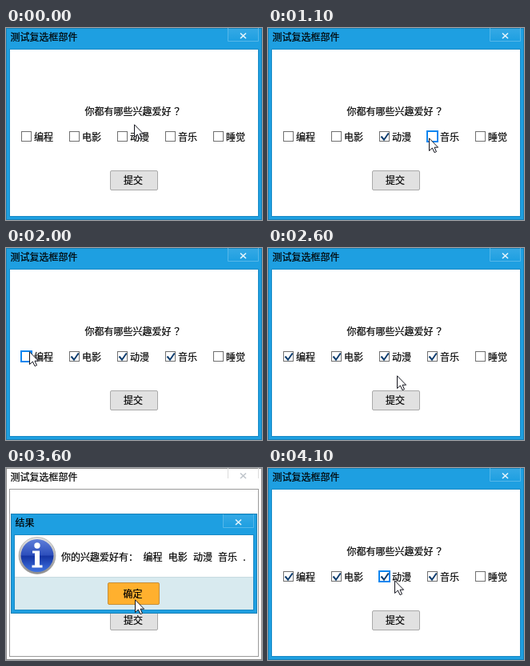
Write an HTML page that moves like this. It is 320 by 240 pixels and loops after 4.3 s.

```html
<!DOCTYPE html>
<html lang="zh-CN">
<head>
<meta charset="utf-8">
<style>
html, body { margin: 0; width: 100%; height: 100%; overflow: hidden; background: #fff; }
svg { display: block; width: 100vw; height: 100vh; }
text { font: 12px "Noto Sans CJK SC", "Noto Sans CJK", "Noto Sans", sans-serif; fill: #000; stroke: #000; stroke-width: .2; }
.centred { font-family: "Noto Sans CJK TC", "Noto Sans CJK", sans-serif; }
.sharp { shape-rendering: crispEdges; }
</style>
</head>
<body>
<svg id="stage" viewBox="0 0 320 240">
  <defs>
    <linearGradient id="ball" x1="0" y1="0" x2="0" y2="1">
      <stop offset="0" stop-color="#5f7fda"/>
      <stop offset=".48" stop-color="#2d4fbc"/>
      <stop offset=".52" stop-color="#1535a4"/>
      <stop offset="1" stop-color="#3f74e2"/>
    </linearGradient>
    <linearGradient id="rim" x1="0" y1="0" x2="0" y2="1">
      <stop offset="0" stop-color="#e4e4e4"/>
      <stop offset="1" stop-color="#8c8c8c"/>
    </linearGradient>
    <linearGradient id="gloss" x1="0" y1="0" x2="0" y2="1">
      <stop offset="0" stop-color="#35a9e5"/>
      <stop offset="1" stop-color="#1e9fe1"/>
    </linearGradient>
  </defs>
</svg>
<script>
const LOOP = 4300, STEP = 50;
const BLUE = '#1e9fe1', EDGE = '#1a80b5', INNER_EDGE = '#1a8ac5';
const stage = document.getElementById('stage');

function add(parent, tag, attrs, content) {
  const el = document.createElementNS('http://www.w3.org/2000/svg', tag);
  set(el, attrs);
  if (content) el.textContent = content;
  parent.appendChild(el);
  return el;
}
function set(el, attrs) {
  for (const name in attrs) el.setAttribute(name, attrs[name]);
}
// Outlined box whose 1px border lies inside the given bounds.
function box(parent, x, y, w, h, fill, stroke) {
  return add(parent, 'rect', { class: 'sharp', x: x + .5, y: y + .5, width: w - 1, height: h - 1, fill, stroke });
}
function label(parent, x, y, content) {
  return add(parent, 'text', { x, y }, content);
}

function closeButton(parent, x, y) {
  const g = add(parent, 'g', { transform: `translate(${x} ${y})` });
  const face = add(g, 'rect', { class: 'sharp', x: 1, y: 1, width: 37, height: 15 });
  const frame = add(g, 'path', { fill: 'none' });
  const cross = add(g, 'path', { d: 'M16 6.5l7 6.5M23 6.5l-7 6.5', 'stroke-width': 1.6 });
  return active => {
    set(face, { fill: active ? 'url(#gloss)' : '#fff' });
    set(frame, { stroke: active ? '#55b7e9' : '#dcdcdc', d: active ? 'M.5 0V16.5H38.5V0' : 'M.5 0V13M38.5 0V13' });
    set(cross, { stroke: active ? '#e6f5fc' : '#bfc5cb' });
  };
}

function button(parent, x, y, w, h, caption) {
  const face = add(parent, 'rect', { x: x + .5, y: y + .5, width: w - 1, height: h - 1, rx: 1.5 });
  label(parent, x + w / 2 - 1, y + h / 2 + 4.5, caption).setAttribute('text-anchor', 'middle');
  const looks = {
    normal: { fill: '#e1e1e1', stroke: '#a9a9a9' },
    hover: { fill: '#a9d8e6', stroke: '#8aa9b3' },
    pressed: { fill: '#ffb02e', stroke: '#c48f3c' }
  };
  return look => set(face, looks[look]);
}

function checkbox(parent, x, caption) {
  const square = add(parent, 'rect', { class: 'sharp', fill: '#fff' });
  const tick = add(parent, 'path', {
    d: `M${x + 2.5} 135.5l3.5 4.2 5.7-8.2`, fill: 'none', stroke: '#0c3c6e', 'stroke-width': 2
  });
  label(parent, x + 16, 141, caption);
  return (hover, checked) => {
    set(square, hover
      ? { x, y: 129, width: 13, height: 13, stroke: '#0d86f0', 'stroke-width': 2 }
      : { x: x + .5, y: 129.5, width: 12, height: 12, stroke: '#707070', 'stroke-width': 1 });
    set(tick, { visibility: checked ? 'visible' : 'hidden' });
  };
}

// Main window
const main = add(stage, 'g', {});
const mainFrame = box(main, 0, 0, 320, 240);
const mainBody = box(main, 4, 26, 312, 210, '#fff');
const mainClose = closeButton(main, 277, 0);
label(main, 5.5, 16, '测试复选框部件');
label(main, 98.5, 109, '你都有哪些兴趣爱好');
label(main, 207.5, 109, '？').setAttribute('class', 'centred');
const options = [['编程', 2250], ['电影', 1800], ['动漫', 850], ['音乐', 1200], ['睡觉', Infinity]]
  .map(([caption, checkedAt], i) => {
    const x = 19 + 60 * i;
    return { x, checkedAt, draw: checkbox(main, x, caption) };
  });
const submit = button(main, 130, 178, 60, 25, '提交');

// Result dialog
const dialog = add(stage, 'g', {});
box(dialog, 6, 57, 308, 125, BLUE, EDGE);
box(dialog, 10, 83, 300, 95, '#fff', INNER_EDGE);
add(dialog, 'rect', { x: 11, y: 136, width: 298, height: 41, fill: '#d8eaef' });
add(dialog, 'rect', { x: 11, y: 136, width: 298, height: 1, fill: '#c8dbe1' });
closeButton(dialog, 271, 58)(true);
label(dialog, 11.5, 73, '结果');
add(dialog, 'circle', { cx: 39, cy: 109.5, r: 23, fill: 'url(#rim)', stroke: '#999', 'stroke-width': .6 });
add(dialog, 'circle', { cx: 39, cy: 109.5, r: 20.5, fill: 'url(#ball)' });
add(dialog, 'circle', { cx: 39, cy: 97, r: 3.7, fill: '#fff' });
add(dialog, 'path', { d: 'M33 103.5h9v18h3.5v3h-13v-3H36v-15h-3z', fill: '#fff' });
label(dialog, 69, 116, '你的兴趣爱好有：');
['编程', '电影', '动漫', '音乐', '.'].forEach((word, i) => label(dialog, 171.5 + 31.2 * i, 116, word));
const confirm = button(dialog, 127, 143, 65, 28, '确定');

const cursor = add(stage, 'path', {
  d: 'M.5 .8V16.5L4.4 13 7 18.6 9.5 17.6 7 12.2H11.6Z', fill: '#fff', stroke: '#14151e'
});

const route = [
  [0, 160, 120], [550, 160, 120], [750, 149, 137], [850, 149, 137], [1100, 201, 137],
  [1200, 201, 137], [1450, 95, 127], [1550, 95, 127], [1650, 88, 135], [1800, 88, 135],
  [2000, 29, 129], [2250, 29, 129], [2600, 161, 159], [2700, 160, 189], [3150, 160, 189],
  [3400, 161, 164], [3900, 161, 164], [4100, 158, 140], [LOOP, 158, 140]
];
function pointer(t) {
  const i = route.findIndex(key => key[0] > t);
  const [t0, x0, y0] = route[i - 1], [t1, x1, y1] = route[i];
  const k = (t - t0) / (t1 - t0);
  return [Math.round(x0 + (x1 - x0) * k), Math.round(y0 + (y1 - y0) * k)];
}

function render(time) {
  const t = Math.floor(time % LOOP / STEP) * STEP;
  const [x, y] = pointer(t);
  const inside = (left, top, w, h) => x >= left && x < left + w && y >= top && y < top + h;
  const dialogOpen = t >= 2950 && t < 3700;
  const active = t < 2950 || t >= 3650;

  set(mainFrame, { fill: active ? BLUE : '#fff', stroke: active ? EDGE : '#8a8a8a' });
  set(mainBody, { stroke: active ? INNER_EDGE : '#9a9a9a' });
  mainClose(active);
  for (const o of options) o.draw(!dialogOpen && inside(o.x - 1, 128, 44, 16), t >= o.checkedAt);

  const overSubmit = inside(130, dialogOpen ? 182 : 178, 60, 25);
  submit(t === 2900 ? 'pressed' : overSubmit ? 'hover' : 'normal');
  confirm(t >= 3600 ? 'pressed' : inside(127, 143, 65, 28) ? 'hover' : 'normal');
  set(dialog, { visibility: dialogOpen ? 'visible' : 'hidden', opacity: t === 3650 ? .5 : 1 });
  set(cursor, { transform: `translate(${x} ${y})` });
}

const start = performance.now();
function tick() {
  render(performance.now() - start);
  requestAnimationFrame(tick);
}
tick();
</script>
</body>
</html>
```
